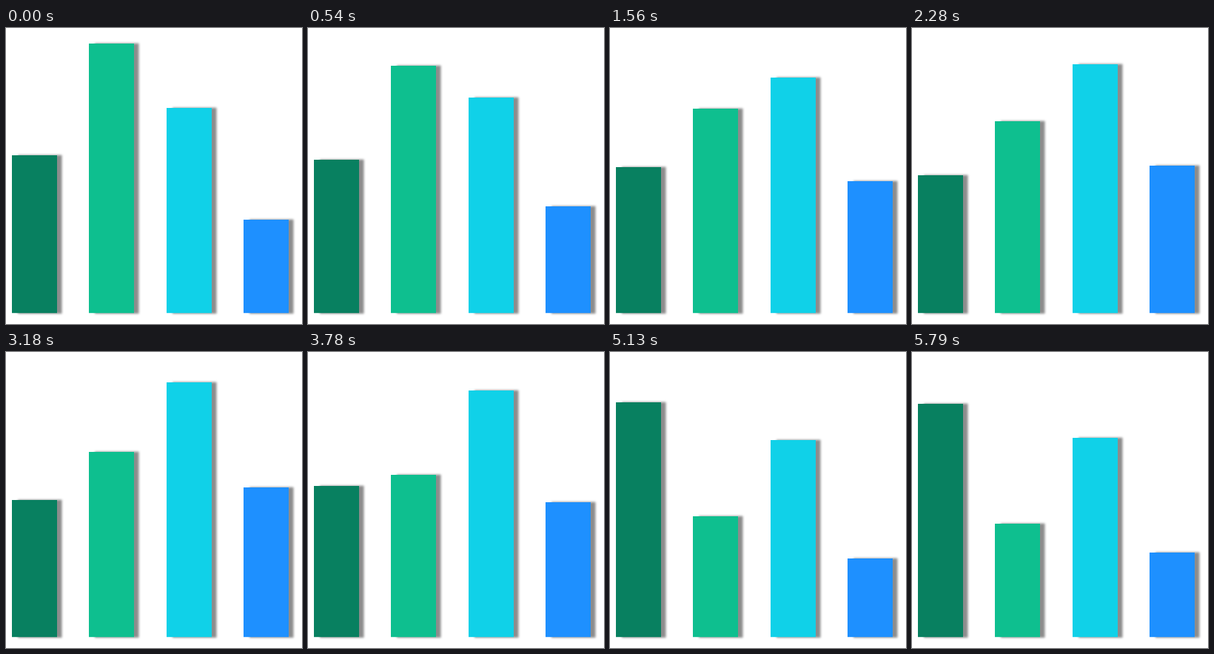
Animation, 400 px wide and 400 px high, one loop 6 s. Source, as an HTML page:

```html
<!DOCTYPE html>
<html lang="en">
<head>
<meta charset="utf-8">
<title>Bar chart</title>
<style>
  html, body { margin: 0; width: 100%; height: 100%; overflow: hidden; background: #fff; }
  svg { display: block; width: 100%; height: 100%; }
</style>
</head>
<body>
<svg id="chart" viewBox="0 0 400 400">
  <defs>
    <filter id="soft" filterUnits="userSpaceOnUse" x="0" y="0" width="400" height="400">
      <feGaussianBlur stdDeviation="1.7"/>
    </filter>
  </defs>
</svg>
<script>
const LOOP = 6000, STEP = 30, LAST = 5790;
const LEFT = 8, PITCH = 104.4, WIDTH = 61, BASE = 385.2;

// Moments where the bars change pace, and each bar's top edge there.
const times = [0, 1560, 3180, 4290, 5130, LAST];
const bars = [
  { color: '#088060', tops: [172, 188, 200, 152, 68, 70] },
  { color: '#0ebf8f', tops: [21, 109, 135, 193, 222, 232] },
  { color: '#10d1e8', tops: [108, 67, 41, 71, 119, 116] },
  { color: '#1e90ff', tops: [259, 207, 183, 229, 279, 271] }
];

const chart = document.getElementById('chart');

function addRect(attrs) {
  const rect = document.createElementNS('http://www.w3.org/2000/svg', 'rect');
  for (const name in attrs) rect.setAttribute(name, attrs[name]);
  return chart.appendChild(rect);
}

function setSpan(rect, top, bottom) {
  rect.setAttribute('y', top);
  rect.setAttribute('height', bottom - top);
}

function slope(values, i) {
  return (values[i + 1] - values[i]) / (times[i + 1] - times[i]);
}

// The first stretch runs at constant speed, the last one bends evenly.
function tangent(values, i) {
  if (i < 2) return slope(values, 0);
  if (i === times.length - 1) return 2 * slope(values, i - 1) - tangent(values, i - 1);
  const before = times[i] - times[i - 1], after = times[i + 1] - times[i];
  return (after * slope(values, i - 1) + before * slope(values, i)) / (before + after);
}

function valueAt(values, t) {
  let i = 0;
  while (i < times.length - 2 && t >= times[i + 1]) i++;
  const span = times[i + 1] - times[i];
  const u = (t - times[i]) / span, v = 1 - u;
  return values[i] * (1 + 2 * u) * v * v
    + values[i + 1] * u * u * (3 - 2 * u)
    + span * u * v * (tangent(values, i) * v - tangent(values, i + 1) * u);
}

bars.forEach((bar, i) => {
  const x = Math.round(LEFT + PITCH * i);
  bar.shadow = addRect({
    x: x + 8, width: WIDTH - 1.5, fill: '#000', 'fill-opacity': 0.45, filter: 'url(#soft)'
  });
  bar.body = addRect({ x, width: WIDTH, fill: bar.color });
});

function draw(now) {
  const t = Math.min(Math.floor((now % LOOP) / STEP) * STEP, LAST);
  for (const bar of bars) {
    const top = Math.round(valueAt(bar.tops, t));
    setSpan(bar.shadow, top - 0.3, BASE + 0.8);
    setSpan(bar.body, top, BASE);
  }
}

const start = performance.now();
function tick() {
  draw(performance.now() - start);
  requestAnimationFrame(tick);
}
tick();
</script>
</body>
</html>
```
